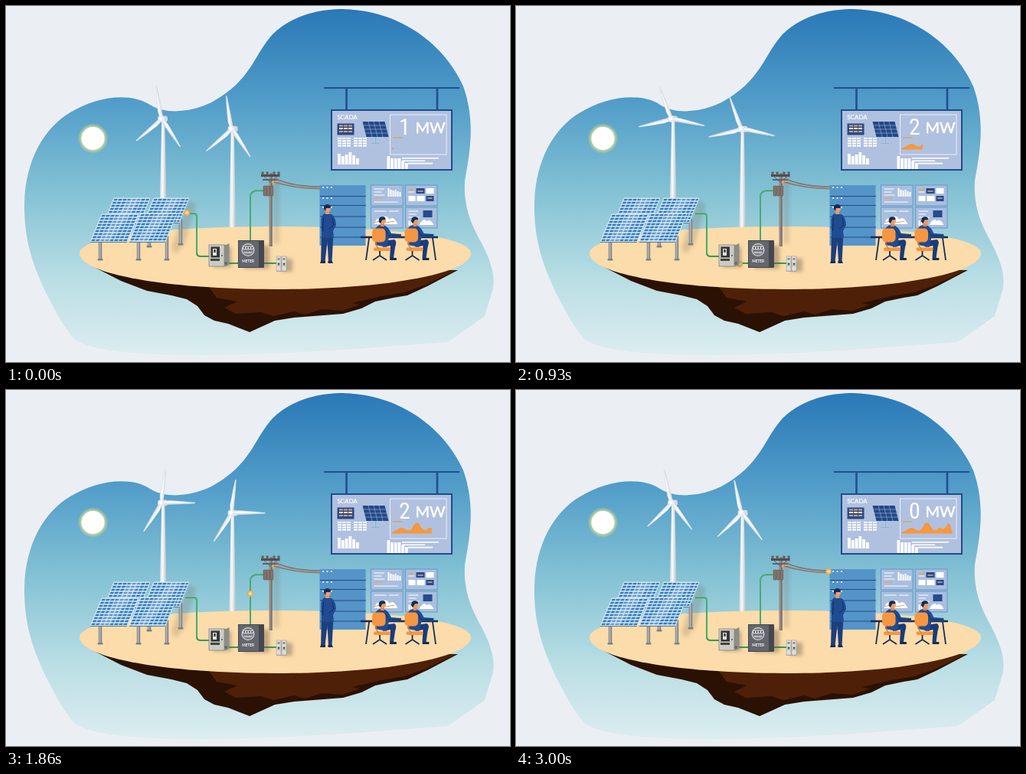
An HTML page that plays this animation: 658 by 465 pixels, repeating every 3030 ms.

```html
<!DOCTYPE html>
<html lang="en">
<head>
<meta charset="utf-8">
<title>Renewable energy monitoring</title>
<style>
html, body { margin: 0; width: 100%; height: 100%; overflow: hidden; background: #ebeff4; }
svg { display: block; width: 658px; height: 465px; }
text { fill: #fff; font-family: Lato, sans-serif; }
#digit { font: 400 30px "Roboto Condensed", "Liberation Sans Narrow", Roboto, sans-serif; font-stretch: 75%; text-anchor: middle; }
</style>
</head>
<body>
<svg id="stage" viewBox="0 0 658 465"></svg>
<script>
const LOOP = 3030;
const stage = document.getElementById('stage');

const rect = (x, y, w, h, fill, more = '') =>
  `<rect x="${x}" y="${y}" width="${w}" height="${h}" fill="${fill}" ${more}/>`;
const path = (d, fill, more = '') => `<path d="${d}" fill="${fill}" ${more}/>`;
const line = (d, color, width = 1, more = '') =>
  path(d, 'none', `stroke="${color}" stroke-width="${width}" ${more}`);
const circle = (x, y, r, fill, more = '') =>
  `<circle cx="${x}" cy="${y}" r="${r}" fill="${fill}" ${more}/>`;
const at = (x, y, body) => `<g transform="translate(${x} ${y})">${body}</g>`;
const gradient = (id, stops, dir) => `<linearGradient id="${id}" ${dir}>` +
  stops.map(([o, c]) => `<stop offset="${o}" stop-color="${c}"/>`).join('') + '</linearGradient>';
const bars = (x, base, step, heights) =>
  heights.map((h, i) => rect(x + i * step, base - h, step - 1, h, '#fff')).join('');

const defs = `<defs>
  ${gradient('sky', [[0, '#2a79b7'], [.27, '#529dc9'], [.53, '#84c2d4'], [.78, '#b9dee4'], [1, '#dcedf0']], 'x2="0" y2="1"')}
  ${gradient('steel', [[0, '#d3d9df'], [.4, '#fafbfc'], [1, '#b3bec9']], '')}
  ${gradient('pipe', [[0, '#73797e'], [.4, '#b4b8ba'], [1, '#6c7175']], '')}
  <radialGradient id="spark"><stop offset="0" stop-color="#fff3cf"/><stop offset=".45" stop-color="#fbc678"/>
    <stop offset=".8" stop-color="#f0a04a"/><stop offset="1" stop-color="#f0a04a" stop-opacity="0"/></radialGradient>
  <radialGradient id="glow"><stop offset=".7" stop-color="#dfe08f"/><stop offset="1" stop-color="#c9d88a" stop-opacity="0"/></radialGradient>
  <pattern id="cells" width="6" height="4" patternUnits="userSpaceOnUse">
    ${rect(0, 0, 6, 4, '#dcebf5')}${rect(.5, .6, 4.8, 2.7, '#2f7abb')}</pattern>
  <filter id="soft" x="-50%" y="-50%" width="200%" height="200%"><feGaussianBlur stdDeviation="2.5"/></filter>
  <clipPath id="reveal"><rect id="window" x="503" y="165" width="3" height="24"/></clipPath>
</defs>`;

function scenery() {
  return path('M24 262C24 205 48 160 84 139C118 118 162 112 188 129C208 142 242 139 268 126C321 97 322 66 348 37C377 9 415 4 440 4C520 6 575 55 597 105C613 150 606 190 599 228C597 262 607 285 621 310C638 342 638 360 635 372L625 405L577 439C480 446 380 455 260 456C180 456 118 452 92 437C78 425 64 398 50 370C34 335 24 305 24 262Z', 'url(#sky)') +
    circle(113.5, 173, 20, 'url(#glow)') + circle(113.5, 173, 15, '#fff') +
    path('M113 340L150 359L184 372L216 378L236 383L250 392L259 404L272 411L290 415L318 426L351 411L376 407L440 402L464 395L482 386L506 381L524 378L550 366L590 345Z', '#2b1103') +
    path('M264 366L275 381L302 386L285 394L300 402L333 400L350 405L376 399L390 403L412 396L440 398L462 390L451 388L490 379L520 374L548 364L588 345L400 360Z', '#4f2008') +
    path('M96 323C96 302 198 288 351.5 288S607 302 607 323C607 350 493 370 351.5 370S96 350 96 323Z', '#fbdcaa');
}

const tower = (x, top, base) =>
  path(`M${x - 1.8} ${top}H${x + 2.2}L${x + 4.5} ${base}H${x - 4}Z`, 'url(#steel)');

const BLADES = [-9, 146, 229];
function rotor(x, y, id) {
  const blade = path('M-1.7 0L-3.2 -10Q-2.3 -28 -.6 -43.8H.5Q1.8 -24 2.2 0Z', '#f6f8fa', 'stroke="#c2ccd6" stroke-width=".4"') +
    line('M1 -1Q1.2 -20 .2 -41', '#d3dae1', .9);
  return at(x, y, rect(-5, -4, 13, 8, '#d4dae0', 'rx="3"') +
    `<g id="${id}">${BLADES.map(a => `<g transform="rotate(${a})">${blade}</g>`).join('')}</g>` +
    circle(0, 0, 4, '#e8ecf0') + circle(-1, -.5, 2.2, '#fff'));
}

const panel = (x, y, w, h) => `<g transform="matrix(1 0 -.41 1 ${x} ${y})">` +
  rect(0, 0, w, h, 'url(#cells)', 'stroke="#e3edf3" stroke-width=".8"') +
  path(`M${w * .45} 0H${w * .78}L${w * .5} ${h}H${w * .2}Z`, '#fff', 'opacity=".22"') +
  line(`M0 ${h + .5}H${w}`, '#557894', 1) + '</g>';

const post = (x, top, base) => rect(x - 2.2, top, 4.4, base - top, 'url(#pipe)') +
  rect(x - 3.5, base - 2, 7, 2.5, '#7c8285', 'rx="1"');

function solarField() {
  return `<g filter="url(#soft)" opacity=".2">${path('M238 253L248 260L234 309L222 324L216 316Z', '#654')}</g>` +
    post(228, 278, 312) + post(187, 280, 315) + panel(141, 251, 47, 33) + panel(193, 251, 46, 32) +
    post(123, 300, 332) + post(173, 300, 332) + post(210, 300, 332) + panel(125, 272, 48, 36) + panel(176, 271, 47, 37);
}

const wires = line('M234 271H245Q249 271 249 275V322Q249 327 254 327H266M285 336H305M319 308V250Q319 241 328 241H338M334 336H355', '#359b59', 2) +
  line('M234 270.5H245Q249 270.5 249 275V322M319 308V250Q319 240.5 328 240.5H338', '#7fd09a', .6);

function pole() {
  const pins = [335, 341, 350, 356].map(x => rect(x - 1.5, 216.5, 3, 4, '#6a5c58')).join('');
  return rect(349, 222, 8, 88, '#765', 'filter="url(#soft)" opacity=".2"') +
    rect(343.5, 218, 4, 96, '#938a86') + rect(346.3, 218, 1.2, 96, '#6f6764') +
    rect(333, 220, 24.5, 3, '#4f4a50') + rect(335, 226, 20, 2, '#696066') + pins +
    line('M336 222L345 230L355 222', '#675f63', 1) +
    [336, 340.4, 344.8].map(x => rect(x, 235, 4, 13, '#84736c', 'rx="1" stroke="#665751" stroke-width=".6"')).join('') +
    rect(347, 228, 7, 4, '#d8a46c', 'rx="1"') +
    line('M353 226C368 233 385 236 411 236M350 230C367 235 386 239 411 238.5', '#8d7168', 1.5);
}

function boxes() {
  const shade = (x, y, w, h) => rect(x, y, w, h, '#654', 'filter="url(#soft)" opacity=".4"');
  const breaker = shade(270, 315, 24, 26) + path('M265 312H287L291.5 310V338L287 340H265Z', '#8b8d86') +
    rect(265, 312, 20, 28, '#cbccc4', 'stroke="#85877f" stroke-width=".8"') +
    rect(267.5, 314.5, 11.5, 14, '#34373a') + rect(270, 317, 5, 9, '#e4e4df') + rect(271.2, 318, 2.6, 4, '#444') +
    rect(267, 330, 12, 3, '#44473f') + circle(282, 326, 1, '#555') + circle(287, 336, 2, '#696b64');
  const meter = shade(311, 313, 33, 30) + rect(304, 306, 33, 36, '#45474e', 'rx="1"') +
    rect(303.5, 306.5, 27, 35, '#64666f', 'stroke="#42454c"') + circle(316, 318.5, 8.5, '#cfd1d3') +
    circle(316, 318.5, 7.3, '#7b7e84') + rect(309, 314, 14, 4, '#e4e5e6') +
    [310, 313.4, 316.8, 320.2].map(x => rect(x, 314.8, 2, 2.3, '#44484f')).join('') +
    line('M311 322H321', '#d5d7d9', 1.4) +
    '<text x="308.3" y="334.7" font-size="4.7" font-weight="700">METER</text>';
  const load = shade(359, 330, 15, 17) + rect(353, 327, 13.5, 20, '#aaa9a2') +
    [353, 360].map(x => rect(x, 327, 6, 19, '#dedfda', 'stroke="#999" stroke-width=".5"') +
      rect(x + 1.5, 329, 3, 3, '#92938e') + rect(x + 1, 335, 4, 5, '#b6b7b1') + rect(x + 2, 336, 2, 2, '#53585b')).join('');
  return breaker + meter + load;
}

function bigScreen() {
  const dashes = (x, y, rows, color, w = 5) => Array.from({ length: rows * 3 }, (_, i) =>
    rect(x + i % 3 * (w + 1), y + Math.floor(i / 3) * 3.2, w, 2, color)).join('');
  return line('M415 107H592', '#20508f', 2) + line('M444.5 107V136M563 107V136', '#20508f', 2.6) +
    rect(425, 136, 157, 78, '#b0c1df', 'stroke="#204b8b" stroke-width="2"') +
    '<text x="432.5" y="148.3" font-size="7.9" stroke="#fff" stroke-width=".2">SCADA</text>' +
    rect(432.5, 153.5, 22, 15, '#274b8e') + dashes(435, 155.5, 1, '#e7a15a') + dashes(435, 159, 1, '#fff') + dashes(435, 163, 1, '#e7a15a') +
    dashes(433, 172, 4, '#fff') + dashes(454, 172, 4, '#fff') +
    path('M465.5 151H494.5L499.5 171H470.5Z', '#234887') +
    line('M473 151L478 171M480 151L485 171M487 151L492 171M467 156H496M468 161H497M469 166H498', '#91a9d2', .7) +
    line('M482.5 171V179M477 179.5H487', '#87b3d6', 1) +
    bars(433, 207, 4.8, [14, 11, 13, 16, 12, 8]) + bars(497.5, 213, 4.7, [17, 14, 14, 14, 10, 8]) +
    line('M517 198.7H565M517 202.2H547M525 205.6H557', '#fff', 1.6) +
    rect(501.5, 142, 73.5, 52, 'none', 'stroke="#e8eef7" stroke-width="1"') +
    line('M505 172H517.5', '#d9a468', 1.8, 'stroke-dasharray="2 .6"') +
    path('M503 187.5Q505 184 510 183Q515 178 520 181Q526 186 530 181Q536 168 540 176Q545 185 549 183Q553 177 557 182Q560 182 564 174Q567 174 568 180L570 187.5Z', '#f6983f', 'clip-path="url(#reveal)"') +
    '<text id="digit" x="520.5" y="168">1</text>' +
    '<text x="534.5" y="166" font-size="20" stroke="#fff" stroke-width=".5">MW</text>';
}

function controlRoom() {
  const monitor = (x, y, body) => at(x, y, rect(0, 0, 41.5, 27, '#a9bfdf', 'stroke="#6d93c5"') + body);
  const hill = path('M4 22Q8 10 13 17Q19 7 24 16Q29 10 35 22Z', '#fff') + line('M4 20L12 18L20 20L31 18', '#e9a263', 1.2);
  const lines = line('M4 5H17M4 9H14M4 13H18', '#fff', 1.2) + line('M4 17H15', '#e9a263', 1.2);
  const tiles = rect(14, 4, 11, 7, '#274b8e') + rect(27, 4, 10, 7, '#fff') + rect(4, 14, 9, 7, '#fff') +
    rect(15, 14, 10, 7, '#fff') + rect(27, 14, 10, 7, '#274b8e') + line('M4 6H12M16 8H23M29 17H35', '#e9a263', 1.4) + line('M4 9H12', '#fff', 1);
  const rack = rect(409.5, 234, 60, 79, '#5594c8') +
    line('M410 248.5H470M410 260.5H470M410 275H470M410 289H470M410 302H470', '#234a80', 1) +
    [237, 251, 263].map(y => [414, 419.5, 425].map(x => circle(x, y, 1.1, '#eaf4fb')).join('')).join('');
  return rack +
    monitor(476.5, 234, lines + bars(22, 15, 3, [11, 9, 8, 9, 7, 6]) + line('M4 22H35', '#fff', 1)) +
    monitor(521.5, 234, tiles) + monitor(476.5, 263, line('M4 5H20M24 5H36', '#fff', 1.2) + hill) +
    monitor(521.5, 263, rect(23, 4, 12, 9, '#274b8e') + lines + bars(4, 24, 3, [7, 5, 9]) + path('M18 23Q24 12 28 18Q32 14 37 23Z', '#fff'));
}

const NAVY = '#204b91', DARK = '#142b59';

const standing = path('M412 297L411 334H416.5L419.5 308L421 334H425.5L427.5 297Z', '#1c3f7d') +
  path('M416 271Q411 273 411.5 283L412 303H427.5L427 294L431 286Q430 275 425 272Z', NAVY) +
  line('M426 277L428 286L422 291M414.5 277L413.5 294', DARK, 1) +
  path('M411 333H417V336H410Z M420.5 333H425.5L427 336H420.5Z', DARK) +
  rect(417, 267, 5, 5, '#e9955f') + circle(419.5, 265, 4.3, '#f0a16d') +
  path('M415 265Q414 259 420 259Q425 260 423.5 264L418 264L417 268Z', DARK);

const seated = x => at(x, 0,
  path('M6 307L20 305Q24 307 21 315L19 329H14L15 313L5 315Z', '#1b3b78') + rect(14, 329, 9, 3, DARK, 'rx="1"') +
  line('M1 318V327M-8 332L1 326L10 332', DARK, 1.8) +
  path('M-5 312V291Q-1 285 6 286Q12 288 16 297L29 298V302H13L10 315Z', NAVY) +
  line('M8 292L13 300H28', DARK, .9) +
  rect(2, 282, 5, 6, '#e48a50') + circle(4.5, 280.5, 4.4, '#f09b5c') +
  path('M-.3 282Q-1 275.5 4 275.2Q9 275 8.5 279L4 279.5L2 284Z', DARK) +
  rect(-9, 290.5, 17.5, 18, '#f59643', 'rx="5"') + rect(-7, 315.5, 22, 4.5, '#f59643', 'rx="2"') +
  line('M-4 308Q-4 315 0 317', '#d67c32', 1.4));

const desk = line('M463 302H564', DARK, 2.6) + line('M474 303L470 332M557 303L561 332', DARK, 1.8);

stage.innerHTML = defs + scenery() + tower(205, 148, 251) + tower(295.5, 161, 289) +
  rotor(203, 147.5, 'rotorA') + rotor(294.5, 160.7, 'rotorB') + solarField() + wires + pole() + controlRoom() +
  circle(0, 0, 4.4, 'url(#spark)', 'id="feed"') + circle(0, 0, 4.4, 'url(#spark)', 'id="branch"') +
  boxes() + bigScreen() + standing + desk + seated(487) + seated(529.5);

// Current along the cables: time, x, y
const FEED = [[0, 236, 270], [120, 249, 271], [580, 249, 326], [660, 259, 326], [930, 292, 337],
  [1130, 318, 336], [1380, 318, 295], [1860, 319, 266], [2080, 319, 247], [2180, 325, 241],
  [2340, 339, 241], [2580, 354, 225], [2760, 375, 233], [3000, 408, 237], [3030, 412, 237]];
const BRANCH = [[1130, 318, 336], [1380, 342, 336], [1560, 359, 336]];
const DIGITS = [[0, 1], [510, 2], [1080, 3], [1650, 2], [2220, 1], [2760, 0]];

const byId = id => document.getElementById(id);
const [rotorA, rotorB, feed, branch, digit, reveal] =
  ['rotorA', 'rotorB', 'feed', 'branch', 'digit', 'window'].map(byId);

function follow(dot, keys, t) {
  const i = keys.findIndex(k => k[0] > t);
  dot.style.display = i > 0 ? '' : 'none';
  if (i < 1) return;
  const [t0, x0, y0] = keys[i - 1], [t1, x1, y1] = keys[i];
  const k = (t - t0) / (t1 - t0);
  dot.setAttribute('transform', `translate(${x0 + (x1 - x0) * k} ${y0 + (y1 - y0) * k})`);
}

function draw(now) {
  const t = now % LOOP;
  for (const rotor of [rotorA, rotorB]) rotor.setAttribute('transform', `rotate(${t / LOOP * 360})`);
  follow(feed, FEED, t);
  follow(branch, BRANCH, t);
  digit.textContent = DIGITS.findLast(d => d[0] <= t)[1];
  reveal.setAttribute('width', Math.min(68, 3 + t * .0267));
}

const start = performance.now();
function tick() {
  draw(performance.now() - start);
  requestAnimationFrame(tick);
}
tick();
</script>
</body>
</html>
```
